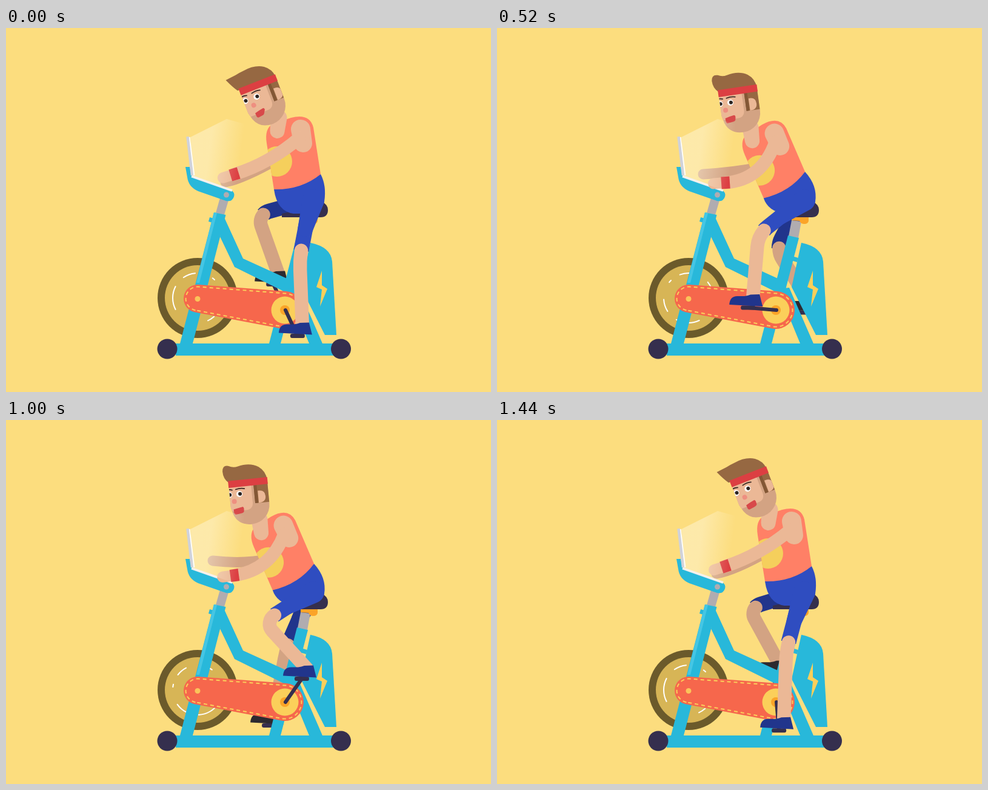
An HTML page with a canvas that plays this animation: 800 by 600 pixels, repeating every 1.52 s.

```html
<!DOCTYPE html>
<html lang="en">
<head>
<meta charset="utf-8">
<title>Exercise bike</title>
<style>
  html, body { margin: 0; width: 100%; height: 100%; overflow: hidden; background: #fcdd7e; }
  canvas { display: block; }
</style>
</head>
<body>
<canvas id="stage" width="800" height="600"></canvas>
<script>
const c = document.getElementById('stage').getContext('2d');
const SKIN = '#ebb896', SHADE = '#d3a383', CYAN = '#28b8da', DARK = '#352f4e',
      SHORTS = '#2f4dc0', NAVY = '#21358c', GREY = '#b0acb0', YELLOW = '#fbcf5a',
      HAIR = '#966842', RED = '#dc3f42', CORAL = '#ff8066', ORANGE = '#fba428';
const RAD = Math.PI / 180, STEP = 40, LOOP = 1520, CYCLE = 36;

// Key poses, joined by a smooth periodic curve
const KEYS = [0, 8, 12, 16, 24, 28, 35];
function curve(...v) {
  const n = KEYS.length;
  const at = i => KEYS[(i + n) % n] + CYCLE * Math.floor(i / n);
  const val = i => v[(i + n) % n];
  const slope = i => (val(i + 1) - val(i - 1)) / (at(i + 1) - at(i - 1));
  return f => {
    const i = KEYS.findLastIndex(k => k <= f), w = at(i + 1) - at(i), s = (f - at(i)) / w;
    return val(i) * (1 + 2 * s) * (1 - s) ** 2 + val(i + 1) * s * s * (3 - 2 * s)
      + w * s * (1 - s) * (slope(i) * (1 - s) - slope(i + 1) * s);
  };
}
const lean = curve(0, .375, .906, 1, .906, .69, 0);
const headX = curve(415.7, 410.5, 397, 399.5, 399, 399, 415.7);
const headY = curve(93.5, 95, 103.5, 104.5, 103, 101, 93.5);
const headTilt = curve(21, 12.5, 8, 0, 5.5, 13.5, 21);
const quiff = curve(1, .1, 0, 0, 0, .5, 1);
const wristY = curve(241, 243, 255, 255, 256, 253, 241);
const wristTilt = curve(17, 4, 4, 1, 8, 18, 18);
const farHandX = curve(362, 349, 340, 338, 341, 349, 362);
const farHandY = curve(254, 219, 241, 248, 232, 230, 253);
const wheelTurn = curve(0, -9, -88, -117, -120, 0, 0);

const fill = (d, color) => { c.fillStyle = color; c.fill(new Path2D(d)); };
function disc(x, y, r, color) {
  c.fillStyle = color;
  c.beginPath();
  c.arc(x, y, r, 0, 7);
  c.fill();
}
function line(d, color, width, cap = 'round') {
  c.strokeStyle = color;
  c.lineWidth = width;
  c.lineCap = cap;
  c.stroke(new Path2D(d));
}
// Outline around two circles
function hull(x1, y1, r1, x2, y2, r2) {
  const dx = x2 - x1, dy = y2 - y1, a = Math.atan2(dy, dx), b = Math.acos((r1 - r2) / Math.hypot(dx, dy));
  c.beginPath();
  c.arc(x1, y1, r1, a + b, a - b + 2 * Math.PI);
  c.arc(x2, y2, r2, a - b, a + b);
  c.closePath();
}
function blob(color, ...circles) {
  hull(...circles);
  c.fillStyle = color;
  c.fill();
}
function group(x, y, deg, draw) {
  c.save();
  c.translate(x, y);
  c.rotate(deg * RAD);
  draw();
  c.restore();
}

const AXLE = { x: 461, y: 465 }, HIP = { x: 503, y: 283 }, THIGH = 92, SHIN = 104;
const PIVOT = { x: 498, y: 282 };
function turned(x, y, deg) {
  const s = Math.sin(deg * RAD), k = Math.cos(deg * RAD), dx = x - PIVOT.x, dy = y - PIVOT.y;
  return { x: PIVOT.x + dx * k + dy * s, y: PIVOT.y - dx * s + dy * k };
}

// Knee of a leg that stretches a little when almost straight
function bendKnee(ankle) {
  const dx = ankle.x - HIP.x, dy = ankle.y - HIP.y, d = Math.hypot(dx, dy);
  const along = d < THIGH + SHIN ? (THIGH ** 2 - SHIN ** 2 + d * d) / (2 * d) : d * THIGH / (THIGH + SHIN);
  const out = Math.sqrt(Math.max(THIGH ** 2 - along ** 2, 144));
  return { x: HIP.x + (dx * along - dy * out) / d, y: HIP.y + (dy * along + dx * out) / d, reach: d };
}

function leg(deg, skin, shorts, shoe, extraHem) {
  const pedal = { x: AXLE.x - 47 * Math.sin(deg * RAD), y: AXLE.y - 47 * Math.cos(deg * RAD) };
  line(`M${AXLE.x} ${AXLE.y}L${pedal.x} ${pedal.y}`, DARK, 6);
  c.fillStyle = DARK;
  c.beginPath();
  c.roundRect(pedal.x - 12, pedal.y - 3.5, 24, 7, 3);
  c.fill();

  const ankle = { x: pedal.x + 8, y: pedal.y - 17 }, knee = bendKnee(ankle);
  const angle = Math.atan2(HIP.y - knee.y, HIP.x - knee.x) - Math.atan2(ankle.y - knee.y, ankle.x - knee.x);
  const hem = 50 + .17 * knee.reach + extraHem;
  c.beginPath();
  c.moveTo(HIP.x, HIP.y);
  c.arcTo(knee.x, knee.y, ankle.x, ankle.y, 20 * Math.abs(Math.tan(angle / 2)));
  c.lineTo(ankle.x, ankle.y);
  c.lineCap = 'butt';
  c.lineWidth = 25;
  c.strokeStyle = shorts;
  c.setLineDash([hem, 999]);
  c.stroke();
  c.lineCap = 'round';
  c.lineWidth = 22.5;
  c.strokeStyle = skin;
  c.setLineDash([400, 400]);
  c.lineDashOffset = -hem;
  c.stroke();
  c.setLineDash([]);
  c.lineDashOffset = 0;
  blob(shorts, 507, 284, 18, (HIP.x + knee.x) / 2, (HIP.y + knee.y) / 2, 12.5);
  group(pedal.x, pedal.y, 0, () => fill('M-31-5Q-30-19-18-19L-6-19Q0-20 4-21.5L19-22L24-2Z', shoe));
}

function flywheel(f) {
  disc(316, 445, 66, '#6b5a2b');
  disc(316, 445, 54, '#d7b556');
  c.strokeStyle = '#fff';
  c.lineWidth = 2;
  c.lineCap = 'round';
  for (const [mid, span] of [[57, 17], [104, 10], [180, 55], [250, 29], [310, 6], [350, 25]]) {
    const a = (mid + wheelTurn(f)) * RAD, b = span / 2 * RAD;
    c.beginPath();
    c.arc(316, 445, 41, a - b, a + b);
    c.stroke();
  }
}

function bike() {
  fill('M280 520H540V540H280Z', CYAN);
  disc(266, 529, 16.5, DARK);
  disc(552.5, 529, 16.5, DARK);
  fill('M346 305L353 280L367 284L360 308Z', GREY);
  fill('M358 308L391 380L470 416V440L377 394L353 344Z', CYAN);
  fill('M336 312L343 314L341 321L334 319Z', CYAN);
  fill('M343 304L362.5 308L308 520H287Z', CYAN);
  fill('M343 304L348 305L319 420H314Z', '#45c6e4');
  fill('M486 317L502 319L497 346L481 343Z', GREY);
  fill('M486 312H514V318Q513 323 507 323Q501 323 499 318L486 317Z', ORANGE);
  fill('M480 342L498 346L453 520H434Z', CYAN);
  fill('M463 430L482 428L522 520H500Z', CYAN);
  fill('M487 376L497 379L495 386L485 383Z', CYAN);
  fill('M502 354Q536 361 538 385L545 506H526L486 427Z', CYAN);
  fill('M521 400L512 427L521 431L518 459L530 430L521 424Z', YELLOW);
  blob('#f6674c', 316, 446, 23, 460, 465, 31);
  hull(316, 446, 19.5, 460, 465, 27.5);
  c.strokeStyle = YELLOW;
  c.lineWidth = 2;
  c.lineCap = 'butt';
  c.setLineDash([6, 5]);
  c.stroke();
  c.setLineDash([]);
  disc(316, 446.5, 4.5, '#fbc45a');
  disc(460, 465, 22.5, YELLOW);
  disc(460, 465, 8, ORANGE);
  fill('M455 306L490 298Q510 284 522 287Q531 291 531 300Q531 312 519 312H455Z', DARK);
}

function laptop() {
  fill('M296 229H303L306 242Q308 246 313 248L371 267Q378 271 376 278Q373 287 363 285L317 269Q301 262 299 246Z', CYAN);
  disc(363.5, 275, 4.5, GREY);
  line('M301 180L309 243', '#fff', 5, 'butt');
  line('M299.5 179L307 243', '#d0d2da', 4.5, 'butt');
  line('M306 244.5L373 268', '#f2f0ee', 3.5, 'butt');
}

function glow() {
  const g = c.createLinearGradient(335, 205, 387, 212);
  g.addColorStop(0, 'rgba(255,250,230,.42)');
  g.addColorStop(1, 'rgba(255,250,230,0)');
  fill('M304 180L364 150L400 160V272L374 268L309 245Z', g);
}

function farArm(f, tilt) {
  const s = turned(450, 215, tilt), low = 238 + 10 * (1 - lean(f)) ** 3;
  line(`M${s.x} ${s.y}Q392 ${low} ${farHandX(f)} ${farHandY(f)}`, SHADE, 17);
}

function nearArm(f, tilt) {
  const s = turned(484, 181, tilt), a = wristTilt(f) * RAD, y = wristY(f);
  const along = k => `${377 + k * Math.cos(a)} ${y - k * Math.sin(a)}`;
  line(`M${s.x} ${s.y}Q${along(60)} ${along(0)}`, SKIN, 21);
  line(`M${along(0)}L${along(-20)}`, SKIN, 18);
  line(`M${along(-7)}L${along(7)}`, RED, 20, 'butt');
}

function shorts(tilt) {
  const l = turned(442, 266, tilt), r = turned(519, 241, tilt);
  fill(`M${l.x} ${l.y}Q447 302 474 306L500 306L525 286Q529 260 ${r.x} ${r.y}Z`, SHORTS);
}

function torso(tilt) {
  group(PIVOT.x, PIVOT.y, -tilt, () => {
    c.translate(-PIVOT.x, -PIVOT.y);
    const shirt = 'M442 266L430 190Q426 166 440 158L470 148Q501 140 507 164L519 241Q487 267 442 266Z';
    fill(shirt, CORAL);
    c.save();
    c.clip(new Path2D(shirt));
    disc(447, 220, 25, '#f5cf5c');
    c.restore();
    blob(SKIN, 450, 148, 13.5, 447.5, 170, 12);
    blob(SKIN, 486, 167, 16, 490, 190, 15);
  });
}

function head(f) {
  const tilt = headTilt(f), turn = tilt * .42 - 2.5, q = quiff(f);
  const skull = 'M-32 0H32V37A32 32 0 0 1 0 69Q-22 69-29 50L-32 38Z';
  group(headX(f), headY(f), -tilt, () => {
    fill(skull, SHADE);
    c.save();
    c.clip(new Path2D(skull));
    c.translate(turn, 0);
    fill('M-60 0H5V33Q5 45-8 45H-60Z', SKIN);
    fill('M9 0H60V35H9Z', HAIR);
    fill('M9 0H14V35H9Z', '#835735');
    fill('M15 15Q27 14 27 25Q27 35 15 35Z', SKIN);
    const far = -32 - turn / 2;
    if (Math.abs(f - 16) < 1.5) {
      line('M-17 18Q-14 19.5-11 18', '#3a2a26', 1.3);
    } else {
      for (const x of [far, -15]) {
        disc(x - .5, 17.5, 5, '#fff');
        disc(x + .5, 17.5, 3, '#2b2320');
      }
    }
    line('M-21 9.5Q-13 7.5-6.5 9.5', '#3a2a26', 1.8);
    line(`M${far - 4} 9.5Q${far} 8 ${far + 5} 10`, '#3a2a26', 1.8);
    disc(-25, 29, 4, '#ee8f80');
    const smile = Math.min(1, Math.max(0, 1.2 - f / 12));
    group(-19, 45, -8, () => fill(
      `M-8-4Q0-5 7-5Q9-5 9-2L${8 - 2 * smile} ${3 - smile}Q${7 - 3 * smile} 5 2 5H-6Q-8 5-8.5 2Z`, '#d8494a'));
    c.restore();
    fill(`M${-32 - 3 * q}-3Q-40-10 ${-40 - 7 * q} ${-22 - 4 * q}Q-39 ${-33 + 6 * q}-29 ${-30 + 2 * q}`
      + `Q-22 ${-26 - 3.5 * q}-14 ${-28 - 2 * q}Q6-33 20-24Q31-16 32-2Z`, HAIR);
    fill('M-32.5-5.5L32.5-6V5.5L-32.5 6Z', RED);
  });
}

function draw(f) {
  const tilt = 16 * lean(f), crank = 205 + 20 * f;
  c.fillStyle = '#fcdd7e';
  c.fillRect(0, 0, 800, 600);
  farArm(f, tilt);
  leg(crank + 180, SHADE, NAVY, '#2c2a30', 10);
  flywheel(f);
  bike();
  laptop();
  shorts(tilt);
  leg(crank, SKIN, SHORTS, NAVY, 0);
  torso(tilt);
  head(f);
  nearArm(f, tilt);
  glow();
}

// 38 ticks show 36 poses: one pose is held mid-way, one at the end
function tick() {
  const k = Math.floor(performance.now() % LOOP / STEP);
  draw(Math.min(k - (k >= 11), CYCLE - 1));
  requestAnimationFrame(tick);
}
tick();
</script>
</body>
</html>
```
